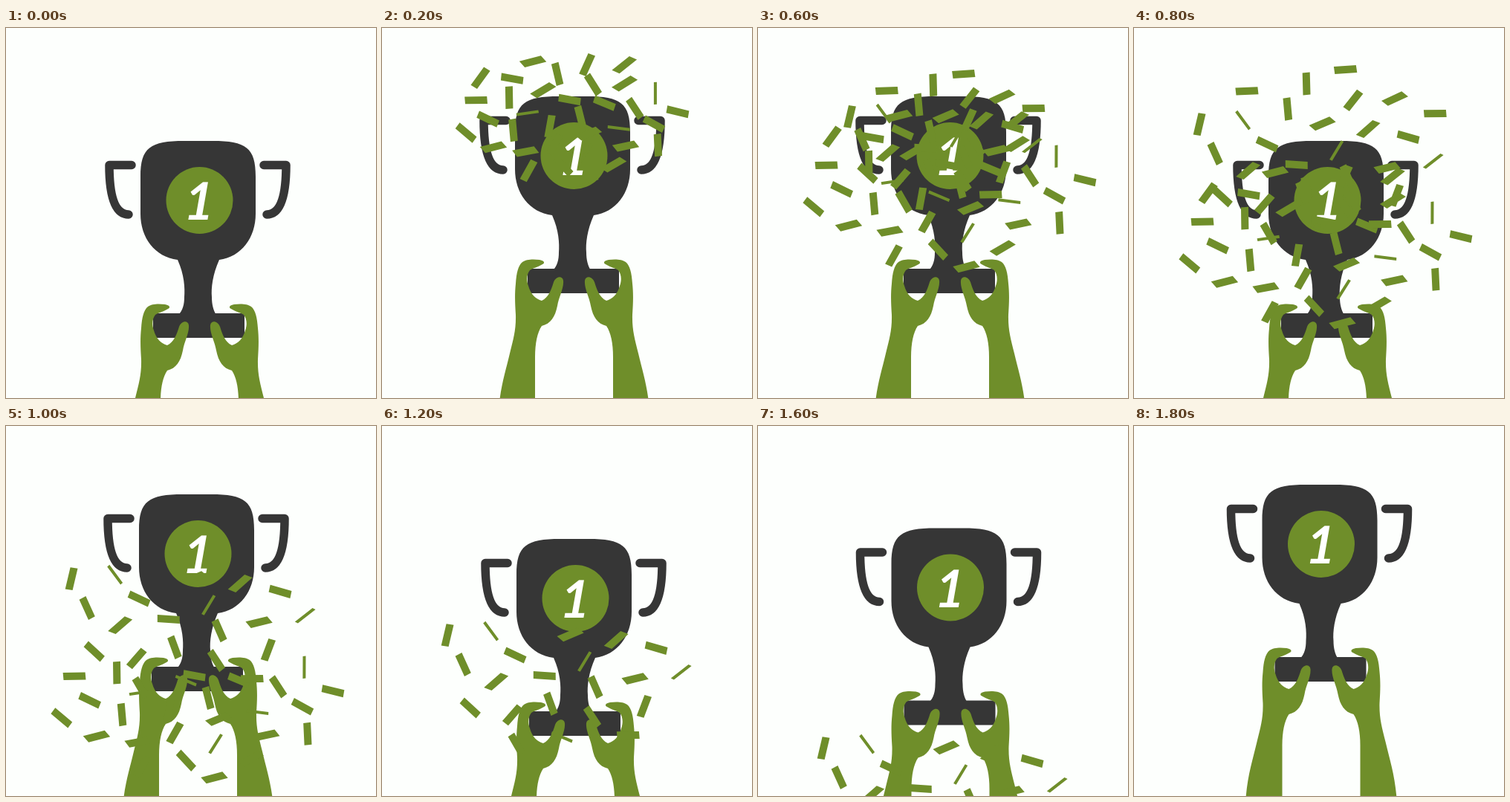
These frames come from a looping animation (498x498 px, 2000 ms). An HTML page:

```html
<!DOCTYPE html>
<html lang="en">
<head>
<meta charset="utf-8">
<title>Trophy</title>
<style>
  html, body { margin: 0; width: 100%; height: 100%; overflow: hidden; background: #fdfffd; }
  svg { display: block; width: 100vw; height: 100vh; }
  .green { fill: #6f8e2a; }
  .dark { fill: #363636; }
  .handle { fill: none; stroke: #363636; stroke-width: 11.5; stroke-linecap: round; stroke-linejoin: round; }
  text { font: italic bold 70px Lato, "Noto Sans", sans-serif; fill: #fff; text-anchor: middle; }
</style>
</head>
<body>
<svg viewBox="0 0 498 498">
  <defs>
    <path id="arm" class="green" d="M158 600C158 552 167 528 174 498C179 478 182.500 466 182 446C181 430 180.500 418 182 404
      C183 390 185 380 191 375C196 371 206 371 214 372C220 373 222 376 218 378C212 382 205 383 201 386
      C197 391 196 399 199 407C202 418 209 425 217 427C226 423 230 412 233 402C236 394 245 393 246 400
      C247 410 240 422 238 434C235 449 229 458 217 461C211 470 208 484 208 503V600Z"/>
    <path id="handle" class="handle" d="M169 184.500H139C139 222 145 251 165 251"/>
  </defs>
  <g id="trophy">
    <use href="#handle"/>
    <use href="#handle" transform="translate(516) scale(-1 1)"/>
    <path class="dark" d="M181 200C181 161 194 152 240 152H278C323 152 336 161 336 200V250C336 282 317 308 287 312
      C278 332 276 350 277 362C277 372 279 380 283 386H232C238 380 240 372 240 362C241 350 240 332 231 312
      C200 308 181 282 181 250Z"/>
    <rect class="dark" x="198" y="384" width="123" height="33" rx="4"/>
    <circle class="green" cx="260.5" cy="232" r="45"/>
    <text transform="translate(259 258) skewX(-3)">1</text>
    <use href="#arm"/>
    <use href="#arm" transform="translate(521) scale(-1 1)"/>
  </g>
  <path id="confetti" class="green"/>
</svg>
<script>
const STEP = 200;
const FALL = 76;
const GOLDEN = Math.PI * (3 - Math.sqrt(5));

// Trophy offset at each step of the loop
const lift = [[0, 0], [-2, -60], [0, 0], [-2, -60], [0, 0], [-2, -60], [0, 0], [-2, -49], [-1.5, -14.5], [-8.5, -73]];

// Pieces thrown highest vanish after `short` steps, the rest after `long`
const bursts = [
  { start: 0, count: 35, cy: 138, rx: 193, ry: 113, short: 4, long: 5 },
  { start: 2, count: 28, cy: 165, rx: 177, ry: 122, short: 2, long: 6 }
];

const trophy = document.getElementById('trophy');
const confetti = document.getElementById('confetti');

function random(seed) {
  const v = Math.sin(seed * 12.9898) * 43758.5453;
  return v - Math.floor(v);
}

function piece(x, y, seed) {
  const angle = (random(seed) - .5) * Math.PI;
  const rising = angle < -.15 && angle > -.8;
  const slant = rising ? 1.1 : 1.5;
  const side = (random(seed + .5) < .14 ? 2 : 5) / Math.sin(slant);
  const ux = 15 * Math.cos(angle), uy = 15 * Math.sin(angle);
  const vx = side * Math.cos(angle + slant), vy = side * Math.sin(angle + slant);
  const corner = (a, b) => `${(x + a * ux + b * vx).toFixed(1)} ${(y + a * uy + b * vy).toFixed(1)}`;
  return `M${corner(-1, -1)}L${corner(1, -1)}L${corner(1, 1)}L${corner(-1, 1)}Z`;
}

// Spread evenly over an ellipse, open out, then fall
function burst({ start, count, cy, rx, ry, short, long }, step) {
  const age = step - start;
  if (age < 1) return '';
  const spread = age === 1 ? .78 : 1;
  const drop = age === 1 ? -18 : FALL * (age - 2);
  let d = '';
  for (let i = 0; i < count; i++) {
    const r = Math.sqrt((i + .5) / count);
    const px = r * Math.cos(i * GOLDEN), py = r * Math.sin(i * GOLDEN);
    if (age > (py < -.4 ? short : long)) continue;
    d += piece(249 + px * rx * spread, cy + py * ry * spread + drop, start * 100 + i + 1);
  }
  return d;
}

let shown = -1;
function draw(now) {
  const step = Math.floor(now / STEP) % lift.length;
  if (step === shown) return;
  shown = step;
  trophy.setAttribute('transform', `translate(${lift[step]})`);
  confetti.setAttribute('d', bursts.map(b => burst(b, step)).join(''));
}

let start;
function tick(now) {
  start ??= now;
  draw(now - start);
  requestAnimationFrame(tick);
}
draw(0);
requestAnimationFrame(tick);
</script>
</body>
</html>
```
